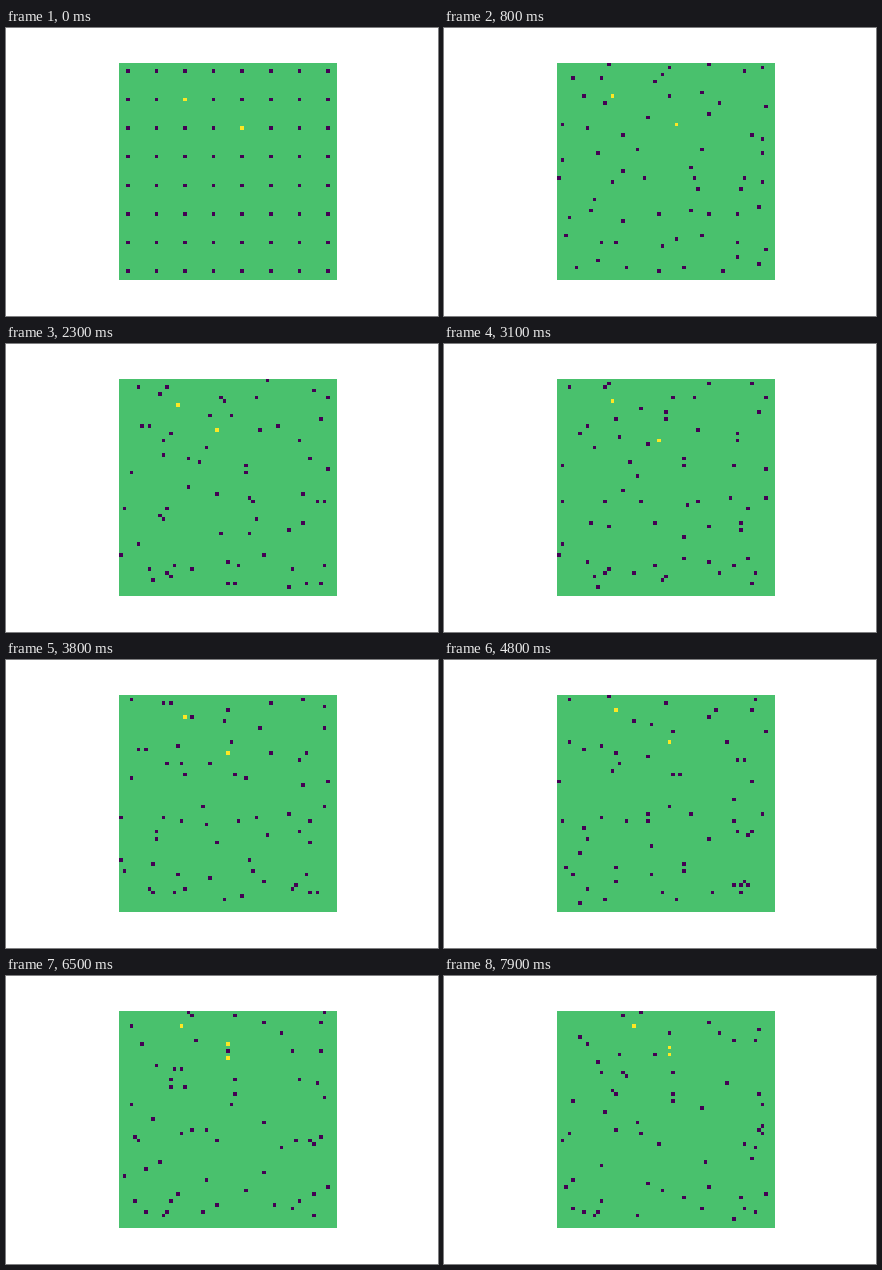
These frames come from a looping animation (432 by 288 pixels, 8000 ms). A matplotlib script:

```python
import numpy as np
import matplotlib.pyplot as plt
from matplotlib.animation import FuncAnimation

SIZE, EDGE, GAP = 61, 58, 8   # grid cells, last reachable cell, start spacing
FRAMES, INTERVAL = 80, 100
WALKER, EMPTY, SICK = 0, 5, 7
MEET = 60                     # step at which the infection spreads

rng = np.random.default_rng(11)
MOVES = np.array([(1, 0), (-1, 0), (0, 1), (0, -1)])


def bridge(a, b, n):
    """Random unit moves leading from a to b in n steps."""
    dx, dy = np.subtract(b, a)
    moves = [(np.sign(dx), 0)] * abs(dx) + [(0, np.sign(dy))] * abs(dy)
    while len(moves) < n:
        axis = 2 * rng.integers(2)
        moves += list(MOVES[axis:axis + 2])
    return rng.permutation(moves)


def walk(start, stops=()):
    """Random walk through (step, cell) stops, reflected at the walls."""
    path, now, here = [[start]], 0, start
    for step, cell in stops:
        path.append(here + np.cumsum(bridge(here, cell, step - now), axis=0))
        now, here = step, cell
    free = MOVES[rng.integers(4, size=FRAMES - 1 - now)]
    path.append(here + np.cumsum(free, axis=0))
    return EDGE - np.abs(EDGE - np.abs(np.vstack(path)))


# start cell: (stops, step from which the walker is sick)
GUIDED = {
    (34, 10): ([(38, (31, 13)), (MEET, (30, 12)), (79, (31, 10))], MEET),
    (18, 10): ([(15, (13, 8)), (38, (18, 6)), (79, (21, 4))], 0),
    (34, 18): ([(38, (30, 16)), (MEET, (30, 12)), (79, (31, 12))], 0),
}

starts = [(x, y) for y in range(2, SIZE, GAP) for x in range(2, SIZE, GAP)]
healthy = [walk(s) for s in starts if s not in GUIDED]
guided = [(walk(s, stops), since) for s, (stops, since) in GUIDED.items()]
walkers = [(path, FRAMES) for path in healthy] + guided


def grid_at(step):
    grid = np.full((SIZE, SIZE), EMPTY)
    for path, since in walkers:
        x, y = path[step]
        grid[y, x] = SICK if step >= since else WALKER
    return grid


fig, ax = plt.subplots(figsize=(6, 4), dpi=72, facecolor="white")
fig.subplots_adjust(left=0.125, right=0.9, bottom=0.125, top=0.88)
ax.axis("off")
image = ax.imshow(grid_at(0), cmap="viridis", vmin=WALKER, vmax=SICK,
                  interpolation="nearest")


def update(step):
    image.set_data(grid_at(step))
    return image,


anim = FuncAnimation(fig, update, frames=FRAMES, interval=INTERVAL,
                     repeat=True, repeat_delay=0)
plt.show()
```
